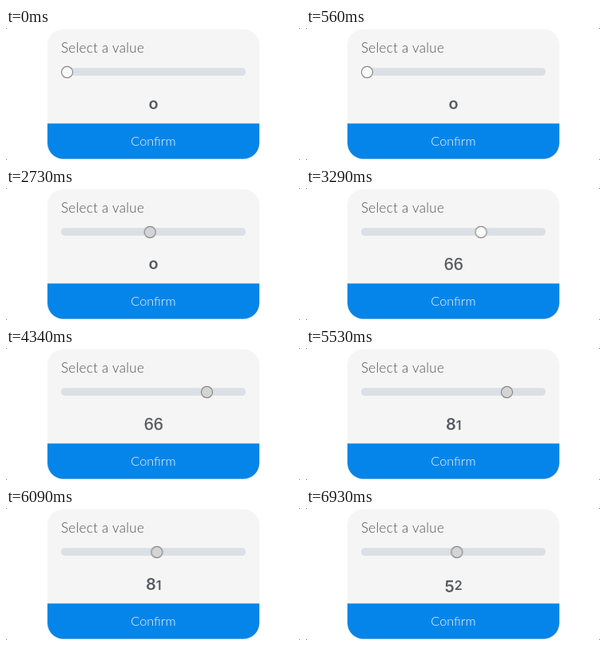
An HTML page that plays this animation: 368 by 166 pixels, repeating every 7280 ms.

```html
<!DOCTYPE html>
<html lang="en">
<head>
<meta charset="utf-8">
<title>Slider</title>
<style>
html, body { margin: 0; width: 100%; height: 100%; overflow: hidden; background: #fff; }
svg { display: block; width: 368px; height: 166px; font-family: Lato, "Open Sans", sans-serif; }
.title { font-size: 17px; font-weight: 300; letter-spacing: .3px; fill: #4c4f52; }
.confirm { font-size: 16.3px; font-weight: 300; text-anchor: middle; fill: #f0faff; }
.value { font: 600 20px Inter, sans-serif; text-anchor: middle; fill: #575b60; visibility: hidden; }
.plain { font: 21.5px "Liberation Sans", Arial, sans-serif; stroke: #575b60; stroke-width: .3; }
.low { font-size: 16px; }
#thumb { stroke: #86888a; stroke-width: 1.2; }
</style>
</head>
<body>
<svg viewBox="0 0 368 166">
  <path d="M0 0h1v1h-1zM367 0h1v1h-1zM0 165h1v1h-1zM367 165h1v1h-1z" fill="#777"/>
  <rect x="51.7" y="1.5" width="265.5" height="163" rx="20" fill="#f5f5f5"/>
  <path d="M52 120.2H317V144.5a20 20 0 0 1-20 20H72a20 20 0 0 1-20-20z"
    fill="#0585ea" stroke="#3f7fb5" stroke-opacity=".5" stroke-width=".7"/>
  <text class="title" x="69" y="30.5">Select a value</text>
  <rect x="69" y="50.3" width="231" height="9.6" rx="4.4" fill="#dce0e4"/>
  <circle id="thumb" cx="76.5" cy="55.5" r="7.1"/>
  <!-- old-style figures: small 0, 1, 2 and a dropped 5 -->
  <text class="value" x="184.5" y="102.3">o</text>
  <text class="value plain" x="184.7" y="102.8">66</text>
  <text class="value" x="184.7" y="102.5">8<tspan class="low">1</tspan></text>
  <text class="value" x="184.7" y="102.5"><tspan dy="3">5</tspan><tspan class="low" dy="-3">2</tspan></text>
  <text class="confirm" x="184.5" y="148.3">Confirm</text>
</svg>
<script>
const LOOP = 7280;
const PX_PER_UNIT = 2.16;

// Thumb presses [down, up] and drags [start, end, slider value].
const presses = [[2030, 3220], [3920, 4410], [5530, 6300], [6930, LOOP]];
const drags = [[2030, 2600, 45], [2660, 2930, 66], [4000, 4340, 81], [5550, 6060, 52]];

const thumb = document.getElementById('thumb');
const run = (el, frames) => el.animate(frames, { duration: LOOP, iterations: Infinity });
const key = (t, prop, value, easing = 'step-end') => ({ offset: t / LOOP, [prop]: value, easing });
const place = (t, value, easing) =>
  key(t, 'transform', `translateX(${value * PX_PER_UNIT}px)`, easing);

let value = 0;
const path = [place(0, value)];
for (const [start, end, next] of drags) {
  path.push(place(start, value, 'ease-in-out'), place(end, next));
  value = next;
}
run(thumb, [...path, place(LOOP, value)]);

const idle = '#fbfbfb', held = '#d4d4d4';
run(thumb, [
  key(0, 'fill', idle),
  ...presses.flatMap(([down, up]) => [key(down, 'fill', held), key(up, 'fill', idle)])
]);

// Each release shows the next number.
document.querySelectorAll('.value').forEach((el, i) => {
  const from = i ? presses[i - 1][1] : 0;
  run(el, [
    key(0, 'visibility', 'hidden'),
    key(from, 'visibility', 'visible'),
    key(presses[i][1], 'visibility', 'hidden'),
    key(LOOP, 'visibility', 'hidden')
  ]);
});
</script>
</body>
</html>
```
